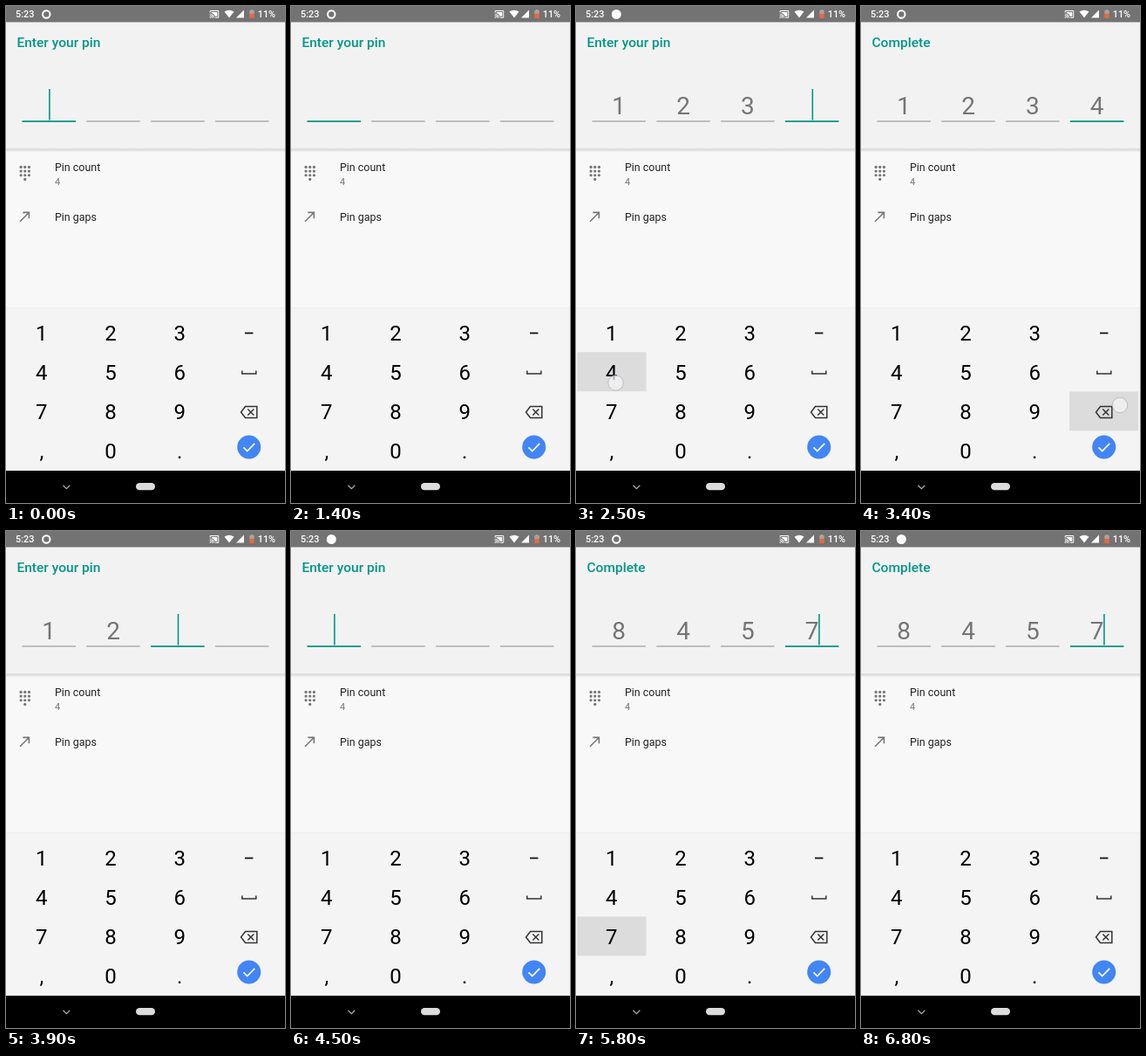
Recreate the animation shown at these times as an HTML page. Size 320 by 569 pixels, loop 7300 ms.

```html
<!DOCTYPE html>
<html lang="en">
<head>
<meta charset="utf-8">
<title>Pin entry</title>
<style>
html, body { margin: 0; height: 100%; overflow: hidden; background: #000; }
svg { display: block; width: 100%; height: 100%; font-family: Roboto, sans-serif; }
.mid { text-anchor: middle; }
.bold { font-weight: 500; }
</style>
</head>
<body>
<svg viewBox="0 0 320 569">
  <defs>
    <linearGradient id="shade" x2="0" y2="1">
      <stop stop-color="#d2d2d2"/><stop offset="1" stop-color="#f8f8f8"/>
    </linearGradient>
  </defs>
  <rect width="320" height="532" fill="#f8f8f8"/>
  <rect width="320" height="164" fill="#f2f2f2"/>
  <rect y="163.5" width="320" height="4" fill="url(#shade)"/>
  <rect y="345" width="320" height="187" fill="#f4f4f4"/>
  <rect y="345" width="320" height="1" fill="#eee"/>

  <!-- status bar -->
  <rect width="320" height="18.5" fill="#737373"/>
  <g fill="#fff" font-size="10.9" class="bold">
    <text x="11" y="13.3">5:23</text>
    <text x="288.7" y="13.3">11%</text>
    <circle id="rec" cx="46.3" cy="9.5" stroke="#fff" stroke-width="2"/>
    <g transform="translate(233.2 3.6) scale(.48)">
      <path d="M1 18v3h3a3 3 0 0 0-3-3zm0-4v2a5 5 0 0 1 5 5h2a7 7 0 0 0-7-7zm0-4v2a9 9 0 0 1 9 9h2A11 11 0 0 0 1 10zM21 3H3a2 2 0 0 0-2 2v3h2V5h18v14h-7v2h7a2 2 0 0 0 2-2V5a2 2 0 0 0-2-2z"/>
      <path d="M5 7h14v10h-5.400A13 13 0 0 0 5 8.400z"/>
    </g>
    <path d="M250.500 6.600Q256 2.700 261.500 6.600L256 13.500z"/>
    <path d="M273 4.500V13.500H264z"/>
  </g>
  <path d="M280.800 4h2.400v1h1.500v4h-5.400V5h1.500z" fill="#b0a09c"/>
  <path d="M279.300 9h5.400v5h-5.400z" fill="#e8693f"/>

  <!-- pin field -->
  <text id="title" x="12.4" y="46.5" font-size="15.56" class="bold" fill="#009688"></text>
  <g id="boxes"></g>
  <rect id="cursor" y="95" width="1.6" height="35.500" fill="#009688"/>

  <!-- settings -->
  <g id="dots" fill="#757575"></g>
  <path transform="translate(12.4 231.700) scale(.778)" fill="#757575"
    d="M9 5v2h6.590L4 18.590 5.410 20 17 8.410V15h2V5z"/>
  <g font-size="12.44" fill="#212121">
    <text x="56" y="189.3">Pin count</text>
    <text x="56" y="245.8">Pin gaps</text>
    <text x="56" y="204.8" font-size="10.9" fill="#757575">4</text>
  </g>

  <!-- keyboard -->
  <rect id="press" width="79" height="45" fill="#dcdcdc"/>
  <g id="keys" class="mid" font-size="24"></g>
  <path d="M274 374.500h9.400" stroke="#111" stroke-width="1.8"/>
  <g fill="none" stroke="#333" stroke-width="1.5">
    <path d="M270.800 417.500v3.500h16v-3.500"/>
    <path d="M274.500 458.500H287.800V471.500H274.500L269.500 465z"/>
    <path d="M277.300 461.500l7 7m0-7l-7 7"/>
  </g>
  <circle cx="278.700" cy="505" r="13.500" fill="#4285f4"/>
  <path d="M272.500 505.300l4.200 4.200 8.500-8.700" fill="none" stroke="#fff" stroke-width="1.7"/>
  <circle id="touch" r="8.700" fill="#f4f4f4" fill-opacity=".75" stroke="#a8a8b8" stroke-opacity=".7"/>

  <!-- navigation bar -->
  <rect y="532" width="320" height="37" fill="#000"/>
  <path d="M65.500 548.700l3.900 3.900 3.900-3.900" fill="none" stroke="#aaa" stroke-width="1.3"/>
  <rect x="149" y="546" width="22" height="8.300" rx="4.150" fill="#dcdcdc"/>
</svg>
<script>
const LOOP = 7300, TEAL = '#009688';
const $ = id => document.getElementById(id);

function add(parent, tag, attrs, text = '') {
  const el = document.createElementNS('http://www.w3.org/2000/svg', tag);
  set(el, attrs);
  el.textContent = text;
  return parent.appendChild(el);
}
function set(el, attrs) {
  for (const k in attrs) el.setAttribute(k, attrs[k]);
}
const show = (el, on) => el.style.visibility = on ? 'visible' : 'hidden';

const boxX = i => 18.5 + 73.8 * i;
const boxes = [0, 1, 2, 3].map(i => ({
  digit: add($('boxes'), 'text', { x: boxX(i) + 30.7, y: 123.5, class: 'mid', 'font-size': 28, fill: '#757575' }),
  line: add($('boxes'), 'rect', { x: boxX(i), width: 61.5 })
}));

for (let i = 0; i < 10; i++) {
  const col = i < 9 ? i % 3 : 1, row = Math.floor(i / 3);
  add($('dots'), 'circle', { cx: 17.1 + 4.67 * col, cy: 184.4 + 4.67 * row, r: 1.6 });
}

const keys = ['123-', '456_', '789<', ',0.'];
keys.forEach((row, r) => [...row].forEach((ch, c) => {
  if (c < 3) add($('keys'), 'text', { x: 40.8 + 79.2 * c, y: 383.4 + 45 * r }, ch);
}));

// key, finger down, finger up, finger position
const taps = [
  ['1', 1600, 1700, 50, 377], ['2', 1900, 2000, 139.5, 371],
  ['3', 2200, 2300, 212, 373], ['4', 2400, 2520, 45.5, 431.5],
  ['<', 3400, 3500, 297, 457], ['<', 3700, 3800, 297, 457],
  ['<', 4000, 4100, 297, 457], ['<', 4300, 4400, 297, 457],
  ['8', 4800, 4900, 126, 465], ['4', 5100, 5200, 47, 420],
  ['5', 5400, 5500, 123, 417], ['7', 5700, 5800, 46, 464]
];
const idleBlinks = [100, 550, 1000, 1600];

function draw(t) {
  let pin = '', edit = 0, tap = null;
  for (const p of taps) {
    const [key, down, up] = p;
    if (t >= up) {
      pin = key === '<' ? pin.slice(0, -1) : pin + key;
      edit = up;
    }
    if (t >= down && t < up + 90) tap = p;
  }

  const full = pin.length === 4, focus = Math.min(pin.length, 3);
  $('title').textContent = full ? 'Complete' : 'Enter your pin';
  boxes.forEach(({ digit, line }, i) => {
    const on = i === focus;
    digit.textContent = pin[i] || '';
    set(line, { y: on ? 131.2 : 131.5, height: on ? 1.8 : 1, fill: on ? TEAL : '#8c8c8c' });
  });

  const blinks = edit ? Math.floor((t - edit) / 500) : idleBlinks.filter(b => t >= b).length;
  set($('cursor'), { x: boxX(focus) + (full ? 59.9 - 21.8 + 0.1 : 30.6) });
  show($('cursor'), blinks % 2 === 0);

  const filled = Math.floor((t + 600) / 1000) % 2;
  set($('rec'), { r: filled ? 4.5 : 4.2, fill: filled ? '#fff' : 'none' });

  show($('press'), tap);
  show($('touch'), tap && t < tap[2]);
  if (tap) {
    const row = keys.findIndex(k => k.includes(tap[0])), col = keys[row].indexOf(tap[0]);
    set($('press'), { x: 1.5 + 79.2 * col, y: 351.2 + 45.1 * row });
    set($('touch'), { cx: tap[3], cy: tap[4] });
  }
}

let start;
function tick(now) {
  start ??= now;
  draw((now - start) % LOOP);
  requestAnimationFrame(tick);
}
draw(0);
requestAnimationFrame(tick);
</script>
</body>
</html>
```
